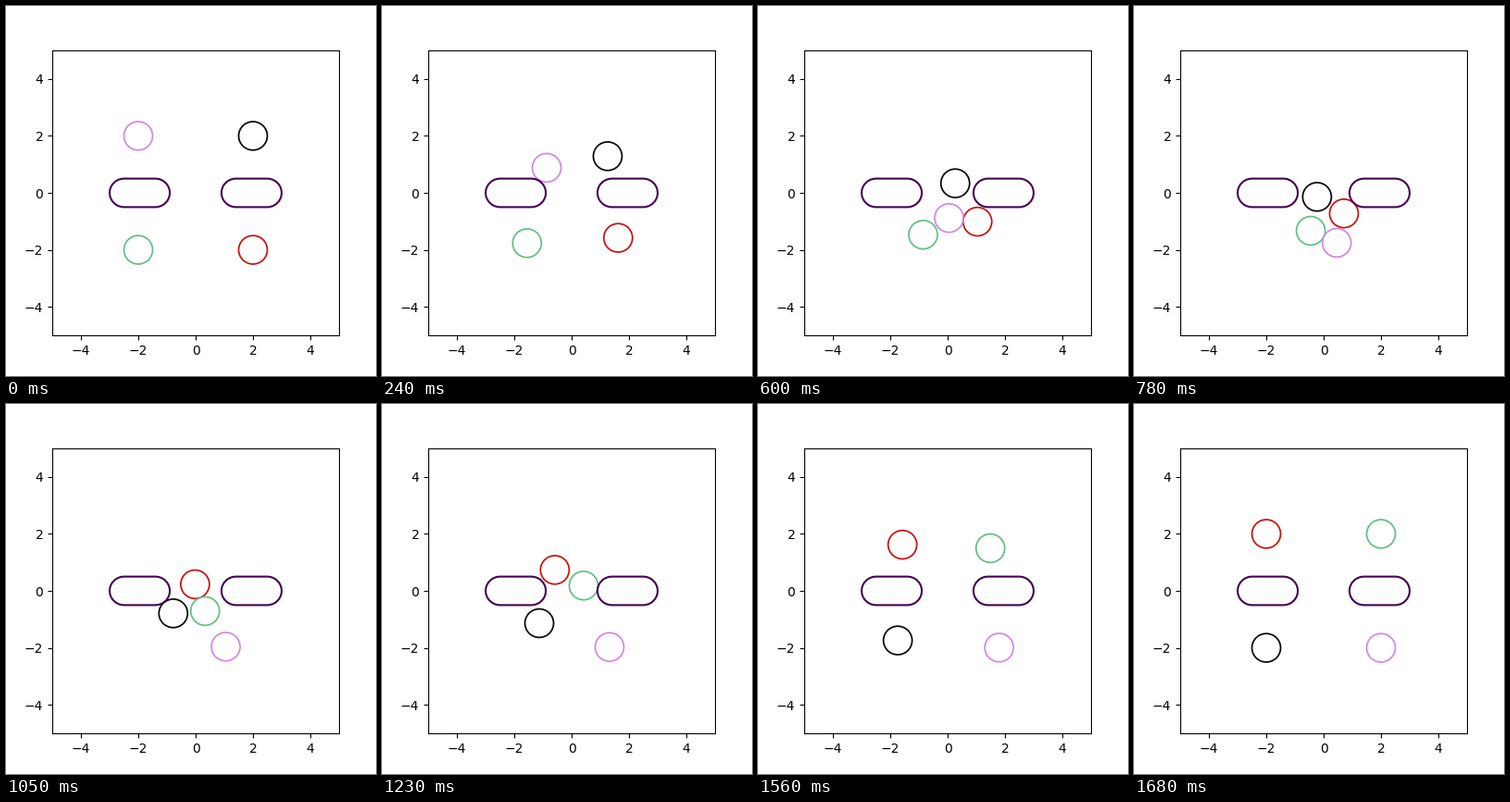
Animation of 400x400 px, one loop 1710 ms. Source, as a matplotlib script:

```python
import numpy as np
import matplotlib.pyplot as plt
from matplotlib.animation import FuncAnimation
from matplotlib.patches import Circle

SLOTS, INTERVAL = 57, 30
LAST_STEP = 38
RADIUS = 0.5
GAP = 2 * RADIUS
WALLS = [(-2.5, -1.4), (1.4, 2.5)]

# Each agent crosses from its corner to the opposite one, turning at (step, x, y)
AGENTS = [
    ("#050303", (2, 2), [(18, -.23, -.14), (24, -.78, -.79)]),
    ("#c8100b", (2, -2), [(10, 1.37, -1.3), (18, .71, -.72), (24, -.02, .23)]),
    ("#60c080", (-2, -2), [(10, -1.26, -1.61), (18, -.45, -1.33),
                           (24, .33, -.71), (32, .98, .99)]),
    ("#d586e2", (-2, 2), [(6, -.87, .88), (10, -.34, -.02),
                          (18, .45, -1.75), (24, 1.05, -1.96)]),
]


def along_route(start, turns, step):
    """Walk straight from turn to turn."""
    x, y = start
    t, xs, ys = zip((0, x, y), *turns, (LAST_STEP, -x, -y))
    return np.array([np.interp(step, t, xs), np.interp(step, t, ys)])


def push_away(pos, other):
    """Move pos out until it is GAP away from other."""
    offset = pos - other
    dist = np.hypot(*offset)
    return pos if dist >= GAP else other + offset * GAP / dist


def positions(step):
    placed = []
    for _, start, turns in AGENTS:
        pos = along_route(start, turns, step)
        walls = [np.array([np.clip(pos[0], *wall), 0]) for wall in WALLS]
        for other in walls + placed:
            pos = push_away(pos, other)
        placed.append(pos)
    return placed


fig, ax = plt.subplots(figsize=(4, 4), dpi=100)

x, y = np.meshgrid(np.linspace(-5, 5, 101), np.linspace(-5, 5, 101))
dist = np.min([np.hypot(x - np.clip(x, *wall), y) for wall in WALLS], axis=0)
ax.contour(x, y, dist, levels=[RADIUS], colors="#440154", linewidths=1.5)

circles = [ax.add_patch(Circle(start, RADIUS, fill=False, ec=color, lw=1.25))
           for color, start, _ in AGENTS]


def update(slot):
    # Two steps per three slots: every second pose is held twice as long
    step = -(-2 * slot // 3)
    for circle, pos in zip(circles, positions(step)):
        circle.center = tuple(pos)
    return circles


anim = FuncAnimation(fig, update, frames=SLOTS, interval=INTERVAL,
                     repeat=True, repeat_delay=0, blit=False)
plt.show()
```
